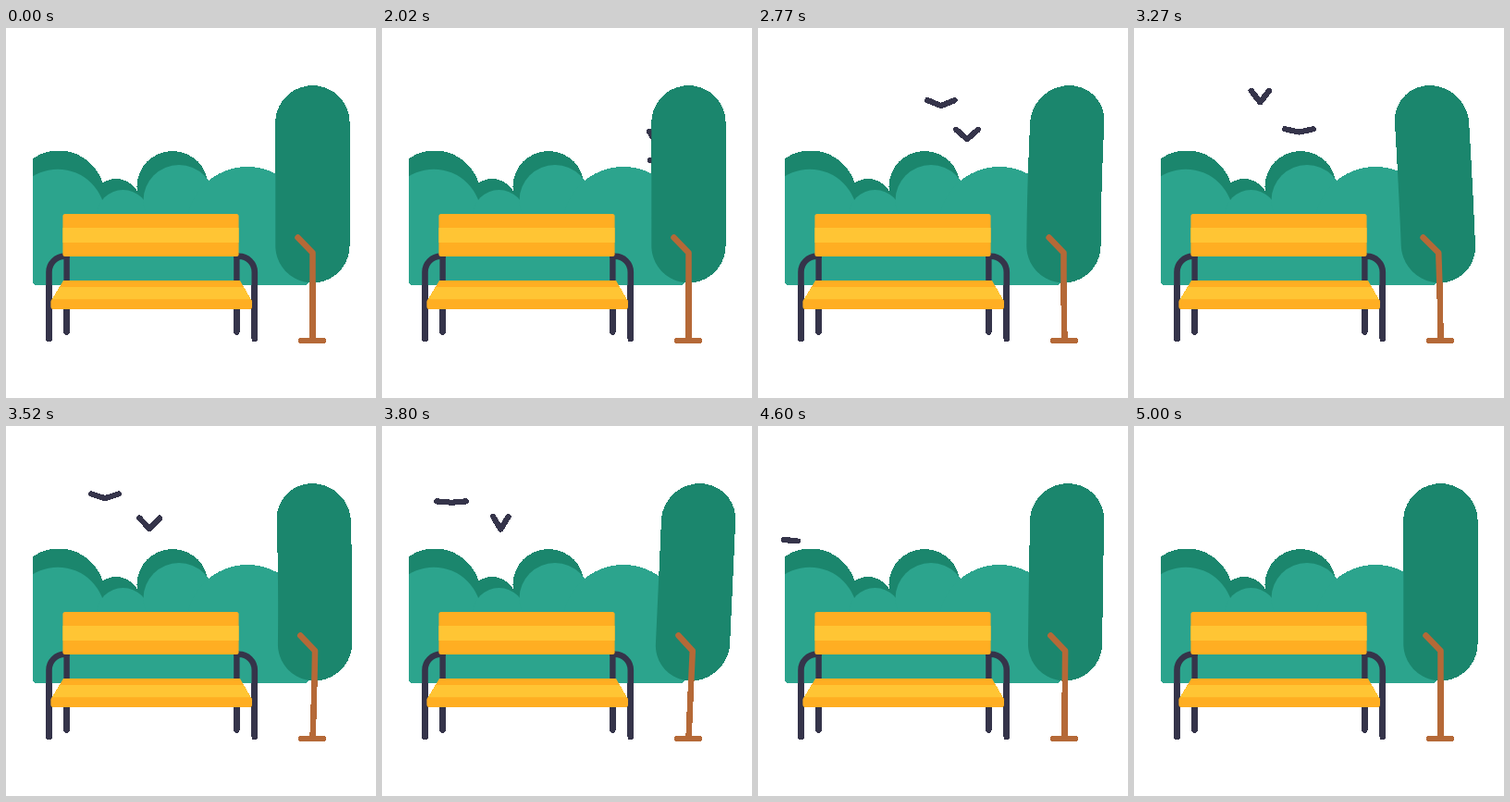
Write an HTML page with a canvas that moves like this. It is 400 by 400 pixels and loops after 6120 ms.

```html
<!DOCTYPE html>
<html lang="en">
<head>
<meta charset="utf-8">
<title>Park bench</title>
<style>
html, body { margin: 0; height: 100%; overflow: hidden; background: #fff; }
canvas { display: block; width: 100vw; height: 100vh; filter: url(#crisp); }
svg { position: absolute; }
</style>
</head>
<body>
<!-- Hard outlines against the white ground -->
<svg width="0" height="0">
  <filter id="crisp" x="0" y="0" width="1" height="1" color-interpolation-filters="sRGB">
    <feComponentTransfer><feFuncA type="discrete" tableValues="0 1"/></feComponentTransfer>
  </filter>
</svg>
<canvas id="stage" width="400" height="400"></canvas>
<script>
const ctx = document.getElementById('stage').getContext('2d');
const LOOP = 6120, START = 2000, TAU = 2 * Math.PI;
const INK = '#35344a', DARK = '#1b866d', LIGHT = '#2ca48d';
const WOOD = '#ffae22', SHINE = '#ffc534', TRUNK = '#b56937';

const clamp = v => Math.max(0, Math.min(1, v));
const ease = v => (1 - Math.cos(Math.PI * clamp(v))) / 2;

// Flight curves over seconds; drop is the height of the folded wings
const BIRDS = [
  {
    dir: 1, end: 2.25,
    x: s => 300 - 138 * s + 7.3 * s * s,
    y: (s, drop) => 74 + 28.5 * (s - 1.27) ** 2 + drop / 2
  },
  {
    dir: -1, end: 2.64,
    x: s => 308 - 101.7 * s - 3.7 * Math.sin(TAU * s / 2.6),
    y: s => 111 + 13.5 * (s - 1.6) ** 2
  }
];

// Swing out, one full swing, then settle
function sway(t) {
  const swing = t < 2500 ? ease((t - START) / 500)
    : t < 3833 ? Math.cos(Math.PI * (t - 2500) / 667)
    : ease((5000 - t) / 1167);
  return 12.5 * swing;
}

// The ground end of the tree leads, the top follows.
function bend([x, y], t) {
  const h = (338 - y) / 275;
  const lead = (185 - 210 * h) * ease((t - START) / 500);
  return [x + h * sway(t + lead), y];
}

function trace(points) {
  ctx.beginPath();
  points.forEach(p => ctx.lineTo(...p));
}

function stroke(color, width) {
  ctx.strokeStyle = color;
  ctx.lineWidth = width;
  ctx.stroke();
}

function fill(color) {
  ctx.fillStyle = color;
  ctx.fill();
}

function line(points, color, width) {
  trace(points);
  stroke(color, width);
}

function shape(points, color) {
  trace(points);
  fill(color);
}

function box(x, y, w, h, r, color) {
  ctx.beginPath();
  ctx.roundRect(x, y, w, h, r);
  fill(color);
}

function disc(x, y, r, color) {
  ctx.beginPath();
  ctx.arc(x, y, r, 0, TAU);
  fill(color);
}

function bushes() {
  ctx.save();
  ctx.beginPath();
  ctx.roundRect(29, 100, 298, 178, [0, 0, 4, 4]);
  ctx.clip();
  disc(57, 182, 49.5, DARK);
  disc(119, 189, 26, DARK);
  disc(180, 171.5, 38.5, DARK);
  disc(56, 204, 51.3, LIGHT);
  disc(126.5, 203.5, 28.5, LIGHT);
  disc(187, 186.5, 38.5, LIGHT);
  disc(261, 216, 66, LIGHT);
  box(29, 204, 298, 74, 0, LIGHT);
  ctx.restore();
}

function bird({ dir, end, x, y }, t) {
  const s = (t - START) / 1000;
  if (s < 0.02 || s >= end) return;
  const flap = dir * Math.cos(TAU * (t - 2038) / 318);
  const angle = (32 + 28 * flap) * Math.PI / 180;
  const dx = 15.8 * Math.cos(angle), dy = 15.8 * Math.sin(angle);
  const at = k => [x(s) + dx * k, y(s, dy) - dy * Math.abs(k)];
  // The right end is wiped away first when the bird leaves.
  const tip = 2 * clamp((end - s) / 0.08) - 1;
  line([at(-1), at(Math.min(tip, 0)), at(tip)], INK, 6.2);
}

function tree(t) {
  const crown = [];
  for (let i = 0; i <= 180; i++) {
    const a = TAU * i / 180;
    crown.push([331.4 + 40.1 * Math.cos(a), (i <= 90 ? 235.3 : 102.3) + 40.1 * Math.sin(a)]);
    // Straight left side between the two half circles
    if (i === 90) for (let y = 230; y > 103; y -= 8) crown.push([291.3, y]);
  }
  for (let y = 110; y < 235; y += 8) crown.push([371.5, y]);
  shape(crown.map(p => bend(p, t)), DARK);

  const trunk = [[315.5, 226.5]];
  for (let y = 243; y <= 338; y += 9.5) trunk.push([331.5, y]);
  line(trunk.map(p => bend(p, t)), TRUNK, 6.5);
  line([[318.5, 338], [343.5, 338]], TRUNK, 6);
}

function legs(back, front) {
  line([[back, 246], [back, 328.5]], INK, 6.4);
  ctx.beginPath();
  ctx.moveTo(back, 246.8);
  ctx.arcTo(front, 246.8, front, 270, 17);
  ctx.lineTo(front, 336);
  stroke(INK, 6.6);
}

function bench() {
  legs(65.6, 46.5);
  legs(249.4, 268.8);
  box(61.4, 201, 190.2, 46, 2.5, WOOD);
  box(61.4, 216, 190.2, 16, 0, SHINE);
  shape([[62, 273], [253, 273], [265.5, 295], [49, 295]], WOOD);
  shape([[58, 280], [257, 280], [265, 294], [49.5, 294]], SHINE);
  box(48.4, 293.3, 217.6, 10.8, 3, WOOD);
}

function draw(t) {
  ctx.clearRect(0, 0, 400, 400);
  ctx.lineCap = ctx.lineJoin = 'round';
  bushes();
  BIRDS.forEach(b => bird(b, t));
  tree(t);
  bench();
}

const begin = performance.now();
function tick() {
  draw((performance.now() - begin) % LOOP);
  requestAnimationFrame(tick);
}
tick();
</script>
</body>
</html>
```
